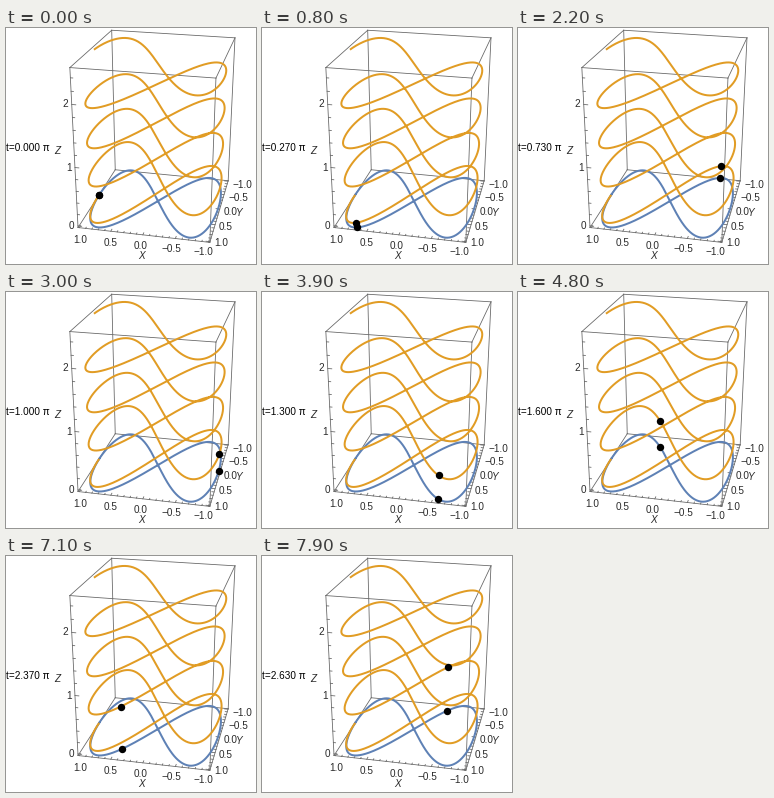
These frames come from a looping animation (250x236 px, 8 s). A matplotlib script:

```python
import itertools

import matplotlib.pyplot as plt
import numpy as np
from matplotlib.animation import FuncAnimation

W, H, DPI = 250, 236, 100
FRAMES, INTERVAL = 80, 100
PX = 72 / DPI
BLUE, ORANGE, EDGE, INK = "#5e81b5", "#e19c24", "#666666", "#2a2a2a"
PAD = 1.02
Z_LO, Z_HI = -0.03, 2.55

plt.rcParams["font.family"] = "Liberation Sans"


def project(x, y, z):
    """Perspective view from the +y side, in pixels."""
    w = 1 + 0.015 * x - 0.079 * y - 0.035 * z
    u = (152 - 57.4 * x - 25.7 * y - 5.2 * z) / w
    v = (173 - 3.6 * x + 15.3 * y - 59.4 * z) / w
    return u, v


def curve(t):
    return np.cos(t), np.sin(2 * t)


fig = plt.figure(figsize=(W / DPI, H / DPI), dpi=DPI, facecolor="white")
ax = fig.add_axes([0, 0, 1, 1])
ax.set_xlim(0, W)
ax.set_ylim(H, 0)
ax.axis("off")


def segment(p, q, width=0.8, z=1):
    (u0, v0), (u1, v1) = project(*p), project(*q)
    ax.plot([u0, u1], [v0, v1], color=EDGE, lw=width * PX, zorder=z)


def label(u, v, s, ha="center", **kw):
    ax.text(u, v, s, ha=ha, va="center_baseline", size=10 * PX,
            color=INK, zorder=2, **kw)


def number(value):
    return f"{value:.1f}".replace("-", "\u2212")


# Bounding box
corners = list(itertools.product((-PAD, PAD), (-PAD, PAD), (Z_LO, Z_HI)))
for p, q in itertools.combinations(corners, 2):
    if sum(a != b for a, b in zip(p, q)) == 1:
        segment(p, q)

# Ticks and tick labels
for i in range(-10, 11):
    s = i / 10
    size = 0.06 if i % 5 == 0 else 0.035
    segment((s, PAD, Z_LO), (s, PAD - size, Z_LO))
    segment((-PAD, s, Z_LO), (-PAD + size, s, Z_LO))
    if i % 5 == 0:
        u, v = project(s, PAD, Z_LO)
        label(u - 2 + 3 * s, v + 10 + 1.5 * s, number(s))
        u, v = project(-PAD, s, Z_LO)
        label(u + 4, v + 1.5 - s, number(s), ha="left")

for i in range(13):
    s = i / 5
    if s > Z_HI:
        break
    size = 0.06 if i % 5 == 0 else 0.035
    segment((PAD, PAD, s), (PAD - size, PAD, s))
    if i % 5 == 0:
        u, v = project(PAD, PAD, s)
        label(u - 6, v - 1, f"{s:.0f}")

for u, v, name in ((135, 227, "X"), (233, 184, "Y"), (51, 122, "Z")):
    label(u, v, name, style="italic")

# Flat curve and its lifted copy
t = np.linspace(0, 2 * np.pi, 400)
ax.plot(*project(*curve(t), 0 * t), color=BLUE, lw=2 * PX, zorder=3)
t = np.linspace(0, 8 * np.pi, 1600)
ax.plot(*project(*curve(t), t / 10), color=ORANGE, lw=2 * PX, zorder=4,
        solid_capstyle="butt")

dots, = ax.plot([], [], "o", color="black", ms=7.4 * PX, mew=0, zorder=5)
clock = ax.text(0, 123, "", ha="left", va="baseline", size=10 * PX,
                color="black", zorder=6)


def update(k):
    turn = k / 30
    t = turn * np.pi
    dots.set_data(*project(*curve(t), np.array([0, t / 10])))
    clock.set_text(f"t={round(turn, 2):.3f} \u03c0")
    return dots, clock


anim = FuncAnimation(fig, update, frames=FRAMES, interval=INTERVAL,
                     repeat=True, repeat_delay=0, blit=False)
plt.show()
```
